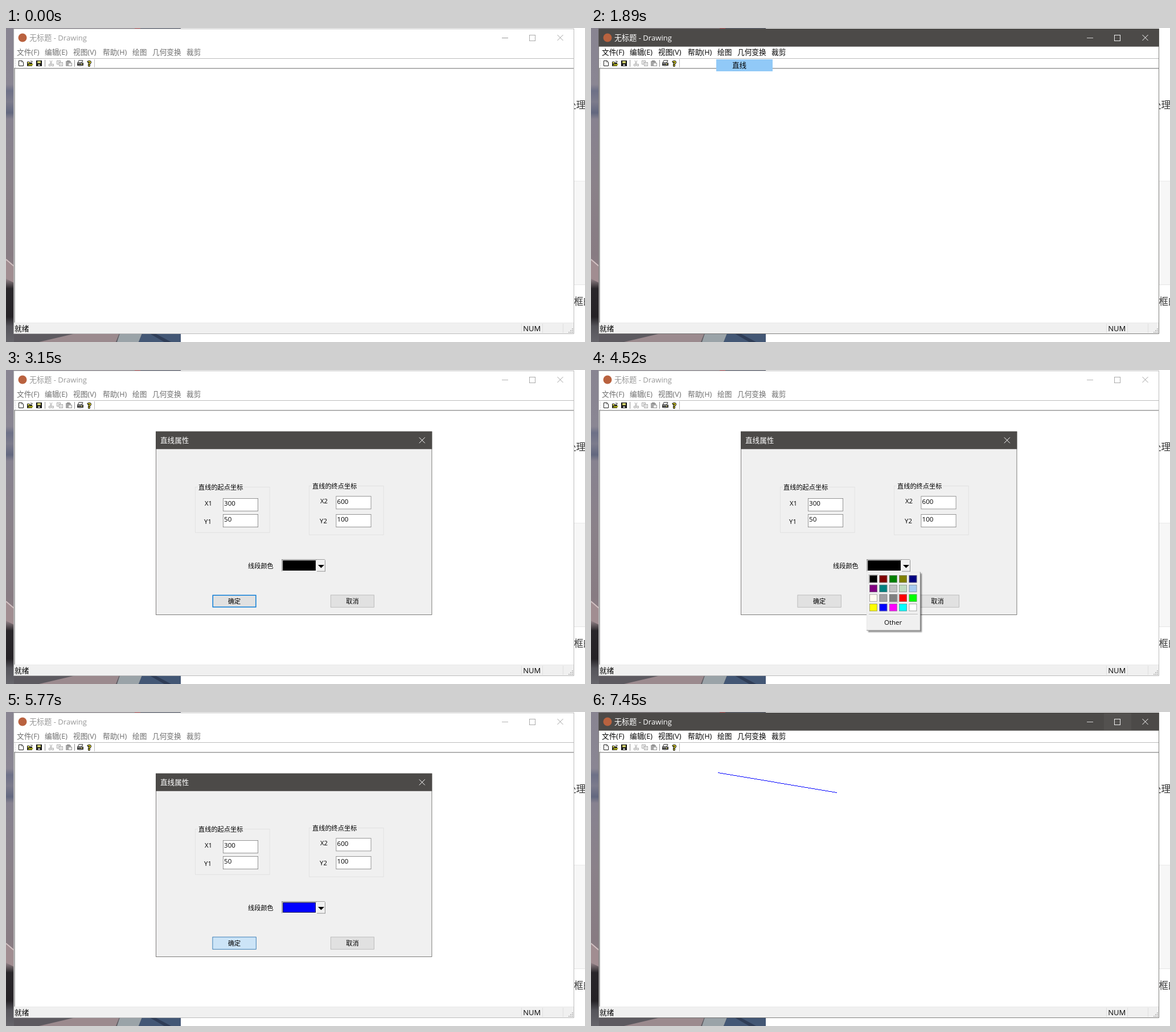
An HTML page with a canvas that plays this animation: 1017 by 551 pixels, repeating every 8 s.

```html
<!DOCTYPE html>
<html lang="zh-CN">
<head>
<meta charset="utf-8">
<title>Drawing</title>
<style>
html, body { margin: 0; width: 100%; height: 100%; overflow: hidden; background: #fff; }
canvas { display: block; }
</style>
</head>
<body>
<canvas id="stage" width="1017" height="551"></canvas>
<script>
const c = document.getElementById('stage').getContext('2d');
const LOOP = 8000;
const FONT = '"Open Sans","Noto Sans CJK SC","Noto Sans CJK",sans-serif';
const DARK = '#4c4a48', FACE = '#f0f0f0';
const HAIR = .7;
const PALETTE = ('000000 800000 008000 808000 000080 800080 008080 c0c0c0 c0dcc0 a6caf0 ' +
  'fffbf0 a0a0a4 808080 ff0000 00ff00 ffff00 0000ff ff00ff 00ffff ffffff').split(' ');

function box(x, y, w, h, fill) {
  c.fillStyle = fill;
  c.fillRect(x, y, w, h);
}
function frame(x, y, w, h, color, width = 1) {
  c.strokeStyle = color;
  c.lineWidth = width;
  c.strokeRect(x + width / 2, y + width / 2, w - width, h - width);
}
function poly(points, fill) {
  c.beginPath();
  points.forEach(([x, y]) => c.lineTo(x, y));
  c.closePath();
  c.fillStyle = fill;
  c.fill();
}
function seg(x1, y1, x2, y2, color, width = 1) {
  c.beginPath();
  c.moveTo(x1, y1);
  c.lineTo(x2, y2);
  c.strokeStyle = color;
  c.lineWidth = width;
  c.stroke();
}
function text(s, x, y, size = 12.6, color = '#000') {
  c.font = `${size}px ${FONT}`;
  c.fillStyle = color;
  c.fillText(s, x, y);
}
function cross(x, y, size, color) {
  seg(x, y, x + size, y + size, color);
  seg(x + size, y, x, y + size, color);
}
// Colour between two [r, g, b] values
function mix(a, b, k) {
  return `rgb(${a.map((v, i) => Math.round(v + (b[i] - v) * k))})`;
}
// Progress from 0 to 1 that advances in discrete ticks
function stepped(t, start, count, tick = 70) {
  return Math.max(0, Math.min(1, (Math.floor((t - start) / tick) + 1) / count));
}

function backdrop() {
  box(0, 0, 1017, 551, '#fff');
  const g = c.createLinearGradient(0, 0, 0, 551);
  [[0, '#888491'], [.18, '#8a8693'], [.2, '#6d7087'], [.235, '#7c7b8c'], [.27, '#62677f'],
   [.29, '#878290'], [.5, '#8a8189'], [.72, '#877b82'], [.8, '#8f8085'], [.83, '#29262a'],
   [.92, '#252226'], [.95, '#55545a'], [1, '#66656b']].forEach(([p, v]) => g.addColorStop(p, v));
  box(0, 0, 14, 551, g);
  poly([[0, 405], [14, 417], [14, 447], [0, 440]], '#a18d91');
  seg(0, 406, 14, 418, '#d3c2c3', 2);

  box(14, 0, 293, 1.2, '#8b858d');
  box(226, 0, 10, 1.2, '#b3545a');
  box(236, 0, 71, 1.2, '#5b6070');

  box(14, 536, 293, 15, '#5d5a60');
  poly([[58, 551], [122, 536], [199, 536], [193, 551]], '#9b8a8e');
  poly([[200, 536], [239, 536], [233, 551], [195, 551]], '#9aa3a8');
  poly([[239, 536], [307, 536], [307, 551], [233, 551]], '#435775');
  poly([[252, 536], [262, 536], [290, 551], [278, 551]], '#2f3d57');

  text('处理', 985, 141, 16.6, '#333');
  box(998, 269, 19, 182, '#f7f7f7');
  box(998, 268.5, 19, HAIR, '#dedede');
  box(998, 450, 19, HAIR, '#dedede');
  text('框的', 997.5, 486, 16.6, '#333');
}

function toolbar() {
  for (let y = 56; y < 69; y += 3) box(16, y, 1, 1, '#b0b0b0');
  // New
  poly([[22.5, 57.5], [28, 57.5], [30.5, 60], [30.5, 66.5], [22.5, 66.5]], '#fff');
  c.strokeStyle = '#222';
  c.lineWidth = 1;
  c.stroke();
  seg(28, 57, 28, 60.5, '#222');
  // Open
  poly([[37, 59], [41, 59], [42, 60.5], [46, 60.5], [46, 67], [37, 67]], '#222');
  poly([[38, 66], [40.5, 63], [48, 63], [45.5, 66.5]], '#9a9a18');
  box(38, 60, 3, 2, '#f2ee55');
  seg(43, 58, 47, 59, '#222');
  // Save
  box(53, 57, 10, 10, '#111');
  box(55, 58, 6, 4, '#c9c96a');
  box(56, 64, 4, 2, '#ddd');
  // Cut
  seg(77, 57, 80.5, 64, '#aaa');
  seg(81, 57, 77.5, 64, '#aaa');
  frame(75, 63, 4, 4, '#aaa');
  frame(80, 63, 4, 4, '#aaa');
  // Copy
  [[89, 57], [93, 60]].forEach(([x, y]) => {
    box(x, y, 7, 7, '#fff');
    frame(x, y, 7, 7, '#a6a6a6');
    box(x + 2, y + 2, 3, 1, '#bbb');
    box(x + 2, y + 4, 3, 1, '#bbb');
  });
  // Paste
  box(105, 58, 9, 9, '#a6a6a6');
  box(107, 57, 5, 2, '#888');
  box(109, 61, 7, 6, '#f4f4f4');
  frame(109, 61, 7, 6, '#999');
  // Print
  poly([[128, 57], [135, 57], [133, 61], [126, 61]], '#fff');
  c.strokeStyle = '#222';
  c.stroke();
  box(125, 61, 11, 5, '#333');
  box(126, 62, 8, 1, '#bbb');
  box(127, 65, 6, 2, '#888');
  box(132, 63, 2, 1, '#e4dc38');
  // Help
  c.font = `bold 12px ${FONT}`;
  c.lineWidth = 2;
  c.strokeStyle = '#111';
  c.strokeText('?', 143.5, 66.5);
  c.fillStyle = '#e6dc28';
  c.fillText('?', 143.5, 66.5);

  [68, 120].forEach(x => box(x, 56, 1, 12, '#8c8c8c'));
  box(155, 55, HAIR, 14, '#a0a0a0');
}

function mainWindow(t, active) {
  const ink = active ? '#fff' : '#a2a2a2';
  box(13.4, 1.2, 984.3, 535.5, '#fff');
  if (active) box(13.4, 1.2, 984.3, 31.5, DARK);

  c.beginPath();
  c.arc(29, 17, 7.5, 0, 7);
  c.fillStyle = '#b9623f';
  c.fill();
  text('无标题 - Drawing', 41, 21.5, 13.1, active ? '#fff' : '#999');

  if (active) {
    const k = stepped(t, 7240, 4);
    if (k) box(901, 2, 48, 30, mix([76, 74, 72], [83, 81, 79], k));
  }
  box(871, 17, 11, 1, active ? '#d2d1d1' : mix([152, 152, 152], [178, 178, 178], stepped(t, 170, 2)));
  frame(919, 12, 11, 11, ink, .9);
  cross(968.5, 12, 10, ink);

  if (t >= 1020 && t < 1890) {
    box(218, 33, 35, 20, '#cce8ff');
    frame(218, 33, 35, 20, '#99d1ff', HAIR);
  }
  const items = [['文件(F)', 19], ['编辑(E)', 68], ['视图(V)', 118], ['帮助(H)', 170],
    ['绘图', 222], ['几何变换', 257], ['裁剪', 317]];
  items.forEach(([s, x]) => text(s, x, 47, 12.7, active ? '#000' : '#6d6d6d'));

  box(14, 53, 983, HAIR, '#a0a0a0');
  toolbar();
  // Sunken edge of the client area
  box(14.2, 70, 983, HAIR, '#a0a0a0');
  box(14.2, 70, HAIR, 447, '#a0a0a0');
  box(14.9, 70.7, 982, HAIR, '#696969');
  box(14.9, 70.7, HAIR, 446, '#696969');

  box(14.2, 517.5, 983, 18.5, FACE);
  box(14.2, 517, 983, HAIR, '#e3e3e3');
  if (t < 1020 || t >= 1890) text('就绪', 15, 532, 12.7);
  text('NUM', 908.3, 532, 13);
  [905, 942, 978].forEach(x => box(x, 519, HAIR, 16, '#d7d7d7'));
  for (let i = 0; i < 3; i++)
    for (let j = 0; j <= i; j++) box(994 - 3 * j, 527 + 3 * i, 2, 2, '#bfbfbf');

  frame(13.4, 1.2, 984.3, 535.5, active ? DARK : '#a0a0a0', HAIR);
}

function menuItem(alpha, lit) {
  c.globalAlpha = alpha;
  if (lit) box(220, 55, 99, 21, '#91c9f7');
  text('直线', 248, 70, 12.6);
  c.globalAlpha = 1;
}
function menu(t) {
  if (t >= 1090 && t < 1890) {
    const k = stepped(t, 1090, 3);
    c.save();
    c.globalAlpha = k;
    c.shadowColor = 'rgba(0,0,0,.35)';
    c.shadowBlur = 4;
    c.shadowOffsetX = c.shadowOffsetY = 2;
    box(218, 53, 103, 25, '#f2f2f2');
    c.restore();
    c.globalAlpha = k;
    frame(218, 53, 103, 25, '#ccc');
    menuItem(k, t >= 1520);
  } else if (t >= 1890 && t < 2240) {
    menuItem([1, .68, .48, .28, .1][Math.floor((t - 1890) / 70)], true);
  }
}

function group(label, x, y, h) {
  frame(x, y, 131.5, h, '#dcdcdc', HAIR);
  box(x + 4, y - 3, 82, 8, FACE);
  text(label, x + 6, y + 4.5, 11.2);
}
function field(value, x, y, hot) {
  box(x, y, 62, 23, '#fff');
  frame(x, y, 62, 23, hot ? '#171717' : '#7a7a7a', .8);
  text(value, x + 2, y + 13.2, 11.6);
}
function button(label, x, fill, edge, width = HAIR) {
  box(x, 394.6, 77, 22, fill);
  frame(x, 394.6, 77, 22, edge, width);
  text(label, x + 27.3, 410, 11.2);
}

function okButton(t) {
  const x = 362.6;
  if (t >= 5770) return button('确定', x, '#cce4f7', '#005499');
  if (t >= 3990 && t < 5140) return button('确定', x, '#e1e1e1', '#adadad');
  const k = stepped(t, 5370, 4);
  button('确定', x, mix([225, 225, 225], [229, 241, 251], k), '#0078d7', k < 1 ? 2 * HAIR : HAIR);
}

function edge(x, y, w, h, light, dark) {
  box(x, y, w, HAIR, light);
  box(x, y, HAIR, h, light);
  box(x, y + h - HAIR, w, HAIR, dark);
  box(x + w - HAIR, y, HAIR, h, dark);
}
function hoverCell(t) {
  return t < 4290 ? -1 : t < 4360 ? 2 : t < 4520 ? 7 : t < 4740 ? 12 : t < 4810 ? 17 : 16;
}
function palette(t) {
  c.save();
  c.shadowColor = 'rgba(0,0,0,.45)';
  c.shadowBlur = 2;
  c.shadowOffsetX = c.shadowOffsetY = 2.8;
  box(484, 354.5, 94.6, 102.8, FACE);
  c.restore();
  edge(484, 354.5, 94.6, 102.8, '#e3e3e3', '#696969');
  const hot = hoverCell(t);
  PALETTE.forEach((color, i) => {
    const x = 489.2 + (i % 5) * 17.35, y = 360.2 + Math.floor(i / 5) * 16.67;
    if (i === 0) edge(x - 1.5, y - 1.3, 17, 16, '#a0a0a0', '#fff');
    if (i === hot) edge(x - 1.5, y - 1.3, 17, 16, '#fff', '#a0a0a0');
    box(x, y, 13.7, 13, '#' + color);
    frame(x, y, 13.7, 13, '#808080', HAIR);
  });
  box(488, 428.3, 86, HAIR, '#a0a0a0');
  box(488, 429, 86, HAIR, '#fff');
  text('Other', 515, 447, 11.5);
}

function dialog(t) {
  box(263, 107.8, 485.3, 322, FACE);
  box(263, 107.8, 485.3, 31, DARK);
  frame(263, 107.8, 485.3, 322, DARK, HAIR);
  text('直线属性', 271, 128, 12.6, '#fff');
  cross(725.8, 118.3, 10, '#fff');

  group('直线的起点坐标', 332, 205, 80.5);
  group('直线的终点坐标', 532, 203, 86.5);
  [['X1', 349, 238], ['Y1', 348, 270], ['X2', 552, 234], ['Y2', 551, 269]]
    .forEach(([s, x, y]) => text(s, x, y, 11.4));
  field('300', 381, 225, t >= 2590 && t < 3150);
  field('50', 381, 253, t >= 2520 && t < 2590);
  field('600', 579.5, 221.3);
  field('100', 579.5, 253);

  text('线段颜色', 425, 348, 11.2);
  box(484, 332, 77, 22, '#fff');
  edge(484, 332, 77, 22, '#a0a0a0', '#fff');
  edge(484.7, 332.7, 75.6, 20.6, '#696969', '#e3e3e3');
  box(486.4, 334.4, 57.6, 17.6, t >= 5140 ? '#00f' : '#000');
  frame(486.4, 334.4, 57.6, 17.6, '#000', HAIR);
  box(546, 333.5, 14, 19.5, FACE);
  edge(546, 333.5, 14.7, 20, '#fff', '#696969');
  poly([[548, 342], [559, 342], [553.5, 347.5]], '#000');

  okButton(t);
  button('取消', 570, '#e1e1e1', '#adadad');
  if (t >= 3990 && t < 5140) palette(t);
}

function drawnLine() {
  for (let x = 223; x <= 431; x++)
    box(x, Math.round(106 + (x - 223) * 35 / 208), 1, 1, '#00f');
}

function render(t) {
  const modal = t >= 1960 && t < 5880;
  backdrop();
  mainWindow(t, t >= 1020 && !modal);
  menu(t);
  if (modal) dialog(t);
  if (t >= 5880) drawnLine();
}

const begin = performance.now();
function tick() {
  render((performance.now() - begin) % LOOP);
  requestAnimationFrame(tick);
}
tick();
</script>
</body>
</html>
```
